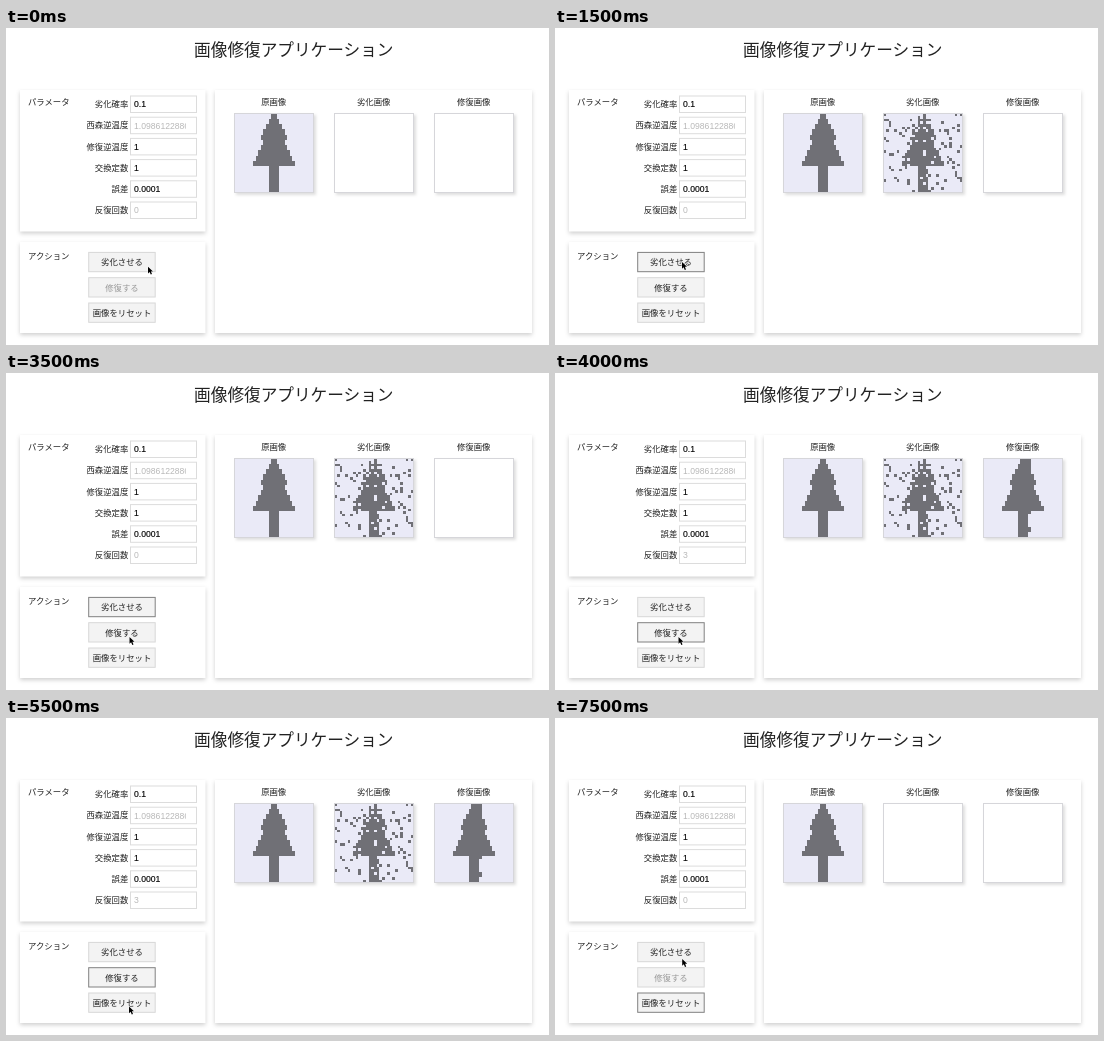
An HTML page that plays this animation: 543 by 317 pixels, repeating every 8 s.

```html
<!DOCTYPE html>
<html lang="ja">
<head>
<meta charset="utf-8">
<style>
  html, body { margin: 0; height: 100%; overflow: hidden; background: #fff; }
  svg { display: block; width: 100%; height: 100%; }
  text { font: 8.4px "Noto Sans CJK JP", "Noto Sans CJK", sans-serif; fill: #222; }
  .title { font-size: 16.65px; }
  .value { font: 8.65px "Liberation Sans", Arial, sans-serif; fill: #000; stroke: #000; stroke-width: .15; }
  .muted { fill: #b8b8b8; stroke: none; }
  .panel { fill: #fff; filter: drop-shadow(0 2.6px 1.9px rgba(0, 0, 0, .19)); }
  .picture { fill: #fff; stroke: #d6d6da; filter: drop-shadow(2.5px 2.5px 1.5px rgba(0, 0, 0, .13)); }
  .field { fill: #fff; stroke: #dcdcdc; }
  .button rect { fill: #f3f3f3; stroke: #d8d8d8; }
  .button.focus rect { stroke: #808080; }
  .button.disabled text { fill: #999; }
  .cells { fill: #707076; shape-rendering: crispEdges; }
</style>
</head>
<body>
<svg id="stage" viewBox="0 0 543 317">
  <clipPath id="fieldClip"><rect x="125" y="60" width="55" height="140"/></clipPath>
</svg>
<script>
const stage = document.getElementById('stage');
const GRID = 30, SIDE = 79, CELL = SIDE / GRID, MIDDLE = (GRID - 1) / 2;

function add(tag, attrs, parent = stage, content = '') {
  const node = document.createElementNS('http://www.w3.org/2000/svg', tag);
  for (const key in attrs) node.setAttribute(key, attrs[key]);
  node.textContent = content;
  return parent.appendChild(node);
}
const rect = (x, y, width, height, cls, parent) =>
  add('rect', { x, y, width, height, class: cls }, parent);
const label = (content, x, y, anchor = 'start', cls = '', parent = stage) =>
  add('text', { x, y, 'text-anchor': anchor, class: cls }, parent, content);

// Half-width of the tree in cells; each tier is two rows high
const tiers = [1, 2, 3, 4, 5, 4, 5, 6, 7, 8];
const treeHalf = row => tiers[row >> 1] || 2;
const isTree = (col, row) => Math.abs(col - MIDDLE) < treeHalf(row);

// The restored tree keeps a few extra cells on its right side
function isRestored(col, row) {
  const half = treeHalf(row), offset = col - MIDDLE;
  const hasBump = row < 4 || row === 20 || row === 26 || row === 27;
  return offset > -half && offset < (hasBump ? 3 : half);
}

let seed = 20;
const random = () => (seed = (seed * 16807) % 2147483647) / 2147483647;
const isDegraded = (col, row) => isTree(col, row) !== random() < 0.1;

function cellImage(x, filled) {
  const group = add('g', { transform: `translate(${x} 85.5)` });
  add('rect', { width: SIDE, height: SIDE, fill: '#eaeaf7' }, group);
  let d = '';
  for (let row = 0; row < GRID; row++)
    for (let col = 0; col < GRID; col++)
      if (filled(col, row)) d += `M${col * CELL} ${row * CELL}h${CELL}v${CELL}h${-CELL}z`;
  add('path', { d, class: 'cells' }, group);
  add('rect', { width: SIDE, height: SIDE, fill: 'none', stroke: '#d6d6da' }, group);
  return group;
}

label('画像修復アプリケーション', 287.8, 28, 'middle', 'title');
rect(14, 62, 185.5, 141.5, 'panel');
rect(14, 214, 185.5, 91, 'panel');
rect(209, 62, 317, 243, 'panel');
add('rect', { y: 50, width: 543, height: 10.5, fill: '#fff' });
label('パラメータ', 22, 77);
label('アクション', 22, 231);

const fields = [
  ['劣化確率', '0.1'], ['西森逆温度', '1.0986122886681098', 'muted'], ['修復逆温度', '1'],
  ['交換定数', '1'], ['誤差', '0.0001'], ['反復回数', '0', 'muted']
].map(([name, value, tone = ''], i) => {
  const y = 76 + i * 21.2;
  label(name, 122.3, y + 3.2, 'end');
  rect(124.5, y - 8, 66, 16.5, 'field');
  const text = label(value, 128, y + 3.3, 'start', 'value ' + tone);
  text.setAttribute('clip-path', 'url(#fieldClip)');
  return text;
});
const iterations = fields[5];

['原画像', '劣化画像', '修復画像'].forEach((name, i) => {
  const x = 228.5 + i * 100;
  label(name, x + 39.2, 77.2, 'middle');
  rect(x, 85.5, SIDE, SIDE, 'picture');
});
cellImage(228.5, isTree);
const degraded = cellImage(328.5, isDegraded);
const restored = cellImage(428.5, isRestored);

const buttons = ['劣化させる', '修復する', '画像をリセット'].map((name, i) => {
  const y = 224.4 + i * 25.3;
  const group = add('g', { class: 'button' });
  rect(82.7, y, 66.5, 19.3, '', group);
  label(name, 116, y + 12.8, 'middle', '', group);
  return group;
});
const cursor = add('path', {
  d: 'M0 0V6.7L1.6 5.3L2.8 7.9L4 7.4L2.9 4.8H5Z',
  fill: '#000', stroke: '#fff', 'stroke-width': .7, 'paint-order': 'stroke'
});

// Time in ms, then the pointer tip
const pointer = [
  [0, 142, 238.7], [500, 127, 234], [2500, 127, 243], [3000, 123.9, 261.7],
  [3500, 123.5, 264], [5000, 123.7, 273.7], [5500, 123, 288.5], [7500, 127.2, 241]
];
const clicks = [1500, 4000, 6500];

function draw(now) {
  const t = now % 8000;
  const step = clicks.filter(time => t >= time).length;
  const [, x, y] = pointer.filter(p => t >= p[0]).pop();
  const hasNoise = step === 1 || step === 2;
  cursor.setAttribute('transform', `translate(${x} ${y})`);
  degraded.style.display = hasNoise ? '' : 'none';
  restored.style.display = step === 2 ? '' : 'none';
  iterations.textContent = step === 2 ? 3 : 0;
  buttons.forEach((node, i) => node.classList.toggle('focus', step === i + 1));
  buttons[1].classList.toggle('disabled', !hasNoise);
}

const start = performance.now();
(function loop() {
  draw(performance.now() - start);
  requestAnimationFrame(loop);
})();
</script>
</body>
</html>
```
